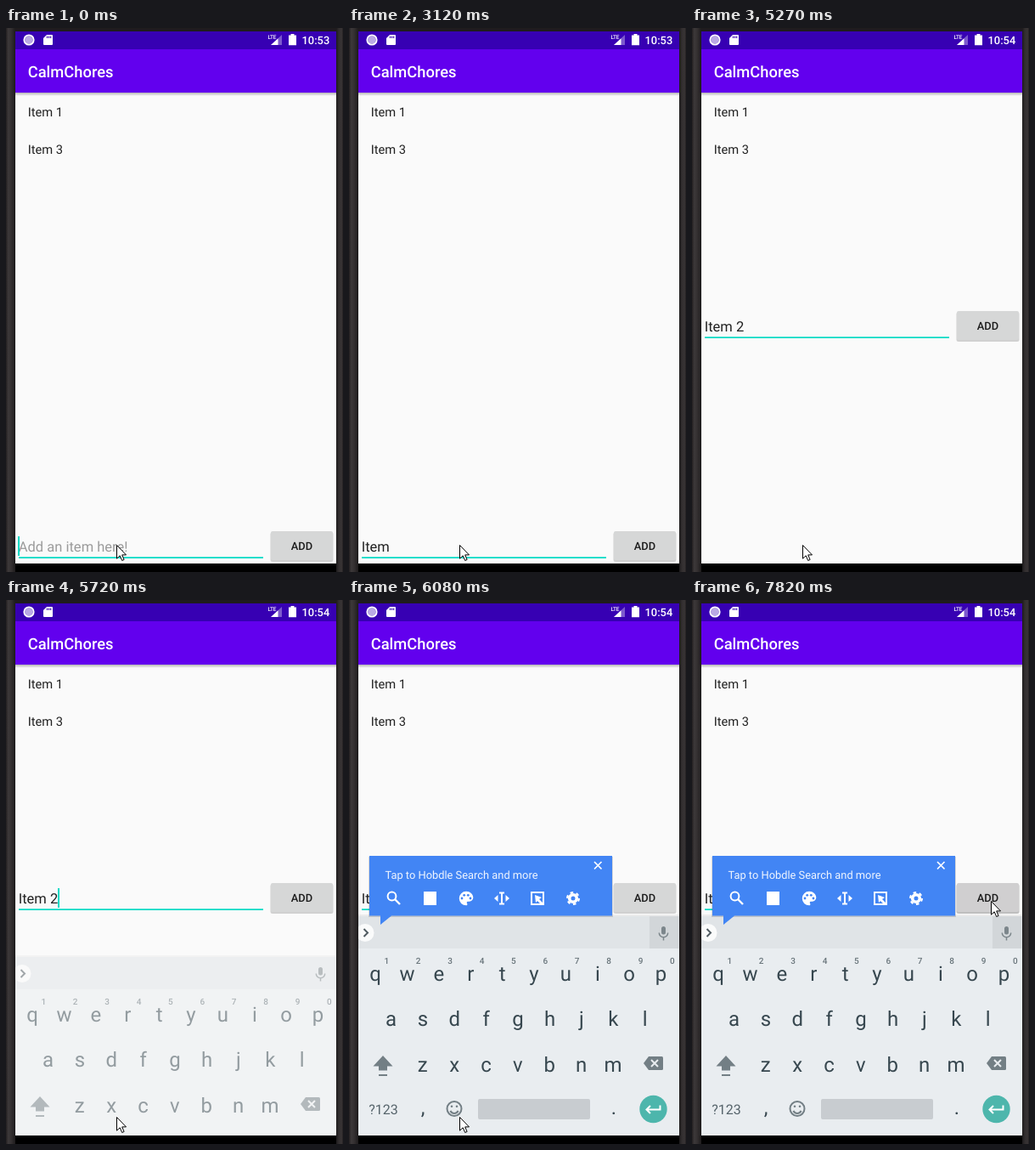
Animation, 397 px wide and 640 px high, one loop 8 s. Source, as an HTML page:

```html
<!DOCTYPE html>
<html lang="en">
<head>
<meta charset="utf-8">
<title>To-do list</title>
<style>
  html, body { margin: 0; width: 100%; height: 100%; overflow: hidden; background: #000; }
  svg { display: block; width: 397px; height: 640px; }
  text { font-family: Roboto, "Open Sans", sans-serif; white-space: pre; text-rendering: geometricPrecision; }
  .medium { font-weight: 500; }
  .mid { text-anchor: middle; }
  .line { fill: none; stroke-width: 2; }
</style>
</head>
<body>
<svg viewBox="0 0 397 640">
  <defs>
    <linearGradient id="left">
      <stop offset="0" stop-color="#231f20"/><stop offset=".25" stop-color="#3d393a"/>
      <stop offset=".6" stop-color="#322e2f"/><stop offset="1" stop-color="#1d1b1c"/>
    </linearGradient>
    <linearGradient id="right">
      <stop offset="0" stop-color="#1d1b1c"/><stop offset=".4" stop-color="#322e2f"/>
      <stop offset=".8" stop-color="#383435"/><stop offset="1" stop-color="#231f20"/>
    </linearGradient>
    <linearGradient id="shade" x2="0" y2="1">
      <stop offset="0" stop-opacity=".28"/><stop offset="1" stop-opacity="0"/>
    </linearGradient>
    <clipPath id="screen"><path d="M11 4H389V630H11Z"/></clipPath>
  </defs>

  <!-- phone -->
  <path fill="#1f1c1d" d="M0 0H397V640H0Z"/>
  <path fill="url(#left)" d="M0 0H11V640H0Z"/>
  <path fill="url(#right)" d="M389 0H397V640H389Z"/>
  <path fill="#fafafa" d="M11 76H389V630H11Z"/>
  <path fill="#000" d="M11 630H389V640H11Z"/>

  <!-- status bar -->
  <path fill="#3700b3" d="M11 4H389V25H11Z"/>
  <circle cx="27" cy="14" r="4.5" fill="#b9a8e4"/>
  <circle cx="27" cy="14" r="5.6" fill="none" stroke="#fff" stroke-width="2"/>
  <path fill="#fff" d="M48 8H54Q55 8 55 9V19Q55 20 54 20H45Q44 20 44 19V12Z"/>
  <path stroke="#3700b3" stroke-width="1.1" d="M48.5 9.5v2.5M50.6 9.5v2.5M52.7 9.5v2.5"/>
  <path fill="#fff" fill-opacity=".35" d="M325 8V20H312Z"/>
  <path fill="#fff" d="M320.500 12.200V20H312Z"/>
  <text class="medium" x="308.500" y="12.500" font-size="6.500" fill="#fff" letter-spacing="-.3">LTE</text>
  <path fill="#fff" d="M335.500 7H339.500V8.400H342V20.200H333V8.400H335.500Z"/>
  <text id="clock" class="medium" x="348.500" y="19" font-size="12.900" fill="#fff"></text>

  <!-- app bar and list -->
  <path fill="#6200ee" d="M11 25H389V76H11Z"/>
  <path fill="url(#shade)" d="M11 76H389V80H11Z"/>
  <text class="medium" x="25.700" y="57.500" font-size="18.380" fill="#fff">CalmChores</text>
  <g font-size="14.700" fill="#212121">
    <text x="25.700" y="104.300">Item 1</text>
    <text x="25.700" y="148.300">Item 3</text>
  </g>

  <!-- entry row -->
  <g id="row">
    <text id="entry" x="14.700" y="616" font-size="16.540"></text>
    <path fill="#03dac5" d="M15 622.200H303V624H15Z"/>
    <rect id="caret" y="598" width="2" height="23" fill="#03dac5"/>
    <rect id="shadow" x="311.500" y="593" width="74" height="35" rx="2.500" fill-opacity=".17"/>
    <rect id="button" x="312" y="592" width="73" height="34" rx="2"/>
    <text class="medium mid" x="348.500" y="613.500" font-size="12.900" fill="#1c1c1c">ADD</text>
  </g>

  <g clip-path="url(#screen)">
    <g id="keyboard">
      <path fill-opacity=".06" d="M11 370H389V372H11Z"/>
      <path fill="#e9edf0" d="M11 372H389V640H11Z"/>
      <path fill="#e0e4e7" d="M11 372H389V410H11Z"/>
      <path id="micBack" fill="#d2d6d9" d="M354 372H388V410H354Z"/>
      <circle cx="19" cy="391.500" r="10.500" fill="#fafbfb"/>
      <path class="line" stroke="#505b61" stroke-width="1.800" d="M17.500 387L22 391.500 17.500 396"/>
      <g stroke="#7c868b" class="line">
        <rect x="368" y="384" width="5" height="9.500" rx="2.500" fill="#7c868b" stroke="none"/>
        <path stroke-width="1.500" d="M365.300 391.500a5.200 5.200 0 0 0 10.400 0M370.500 397v3.500"/>
      </g>
      <g id="keys" fill="#37474f"></g>
      <path fill="#737f85" d="M40 536L51.500 548.500H45V553.500H35V548.500H28.500ZM35 558H45V560H35Z"/>
      <path fill="#737f85" d="M353 537H368.500Q370 537 370 538.500V551.500Q370 553 368.500 553H353L347 545Z"/>
      <path class="line" stroke="#e9edf0" stroke-width="1.800" d="M356 541l8 8m0-8l-8 8"/>
      <g class="line" stroke="#737f85" stroke-width="1.800">
        <circle cx="124" cy="598.500" r="8.500"/>
        <path d="M119.500 600.800a4.800 4.800 0 0 0 9 0"/>
        <path stroke-linecap="round" stroke-width="2.600" d="M121 595.700h.01M127 595.700h.01"/>
      </g>
      <rect x="152" y="587" width="132" height="24" rx="2" fill="#c8ccd0"/>
      <circle cx="358.500" cy="599" r="16.200" fill="#4db6ac"/>
      <path class="line" stroke="#fff" d="M366.500 594.500V599.500H351M355 595L350.500 599.500 355 604"/>
    </g>

    <!-- tool bubble -->
    <g id="bubble">
      <path fill-opacity=".14" d="M23 302H311V373H23Z"/>
      <path fill="#4285f4" d="M24 301H310V371.500H50L37 382V371.500H24Z"/>
      <text x="42.500" y="327.500" font-size="12.870" fill="#fff" fill-opacity=".92">Tap to Hobdle Search and more</text>
      <g stroke="#fff" class="line">
        <path stroke-width="1.700" d="M289 308l8.500 8.500m0-8.500l-8.500 8.500"/>
        <circle cx="50.500" cy="348.500" r="4.900"/>
        <path stroke-width="2.400" d="M54 352L60 358"/>
        <path d="M180 344.500V357.500M177 344.500H183M177 357.500H183"/>
        <path d="M215 344H229V358H215Z"/>
        <circle cx="264" cy="351" r="4.300" stroke-width="3.600"/>
        <circle cx="264" cy="351" r="6.900" stroke-width="2.200" stroke-dasharray="3.610"/>
      </g>
      <g fill="#fff">
        <path d="M88 343H103V359H88Z"/>
        <path d="M171 351L175.500 347V355ZM189 351L184.500 347V355Z"/>
        <path d="M219 347L227 350 224 352 229 357 227 359 222 354 220 356Z"/>
        <path transform="translate(127 340) scale(.92)" d="M12 3a9 9 0 0 0 0 18c.83 0 1.500-.67 1.500-1.500 0-.39-.15-.74-.39-1-.23-.26-.38-.61-.38-1 0-.83.67-1.500 1.500-1.500H16a5 5 0 0 0 5-5c0-4.420-4.030-8-9-8Z"/>
      </g>
      <g fill="#4285f4">
        <circle cx="133" cy="351" r="1.400"/><circle cx="135.700" cy="347.300" r="1.400"/>
        <circle cx="140.300" cy="347.300" r="1.400"/><circle cx="143" cy="351" r="1.400"/>
      </g>
    </g>
  </g>

  <path id="mouse" fill="#fff" stroke="#000" stroke-linejoin="round" d="M.5.5V16.200L4.200 12.800 6.700 18.500 9.100 17.500 6.700 11.900H11.500Z"/>
</svg>

<script>
const $ = id => document.getElementById(id);
const LOOP = 8000;

// Each track lists [start time, value] and holds until the next start.
const typed = [[0, ""], [1550, "I"], [1970, "It"], [2090, "Ite"], [2370, "Item"], [2620, "Item "], [4730, "Item 2"]];
const caretOn = [[0, 1], [400, 0], [1020, 1], [3120, 0], [3670, 1], [4170, 0], [4730, 1], [5270, 0], [5720, 1]];
const slide = [[0, null], [5720, 48], [5840, 9], [5960, 0]];
const pointer = [[0, [130, 608]], [6330, [194, 491]], [6480, [254, 351]], [6630, [289, 240]],
  [6750, [324, 288]], [6870, [347, 339]], [7020, [351, 350]], [7140, [352, 354]]];

const at = (track, t) => track.filter(step => step[0] <= t).pop()[1];
const show = (id, on) => $(id).style.display = on ? "" : "none";

function addKey(label, x, y, size = 24, cls = "mid") {
  const key = document.createElementNS("http://www.w3.org/2000/svg", "text");
  const attrs = { x, y, "font-size": size, class: cls };
  for (const name in attrs) key.setAttribute(name, attrs[name]);
  key.textContent = label;
  $("keys").append(key);
  return key;
}

const PITCH = 37.4;
[["qwertyuiop", 31, 447.5], ["asdfghjkl", 49.5, 501], ["zxcvbnm", 86.7, 554.5]].forEach(([row, x, y]) =>
  [...row].forEach((letter, i) => addKey(letter, x + PITCH * i, y)));
[..."1234567890"].forEach((digit, i) =>
  addKey(digit, 44.3 + PITCH * i, 428, 10, "mid medium").setAttribute("fill", "#69757b"));
addKey("?123", 40.5, 604.5, 16).setAttribute("fill", "#56646b");
addKey(",", 87, 605);
addKey(".", 312, 605);

function draw(t) {
  const text = at(typed, t), raised = t >= 5270, pressed = t >= 7820;
  $("clock").textContent = t < 5020 ? "10:53" : "10:54";
  $("row").setAttribute("transform", `translate(0 ${raised ? -259 : 0})`);

  const entry = $("entry");
  entry.textContent = text;
  const width = text ? entry.getComputedTextLength() : 0;
  $("caret").setAttribute("x", Math.floor(14.7 + width));
  show("caret", at(caretOn, t));
  entry.textContent = text || "Add an item here!";
  entry.setAttribute("fill", text ? "#212121" : "#9b9b9b");

  $("button").setAttribute("fill", pressed ? "#d0cfd0" : "#d6d7d7");
  $("shadow").setAttribute("fill-opacity", pressed ? .24 : .17);

  const drop = at(slide, t);
  show("keyboard", drop !== null);
  $("keyboard").setAttribute("transform", `translate(0 ${drop || 0})`);
  $("keyboard").setAttribute("opacity", 1 - (drop || 0) / 100);
  show("bubble", t >= 6080);
  show("micBack", t >= 6080);
  $("mouse").setAttribute("transform", `translate(${at(pointer, t)})`);
}

const start = performance.now();
function frame() {
  draw((performance.now() - start) % LOOP);
  requestAnimationFrame(frame);
}
frame();
</script>
</body>
</html>
```
